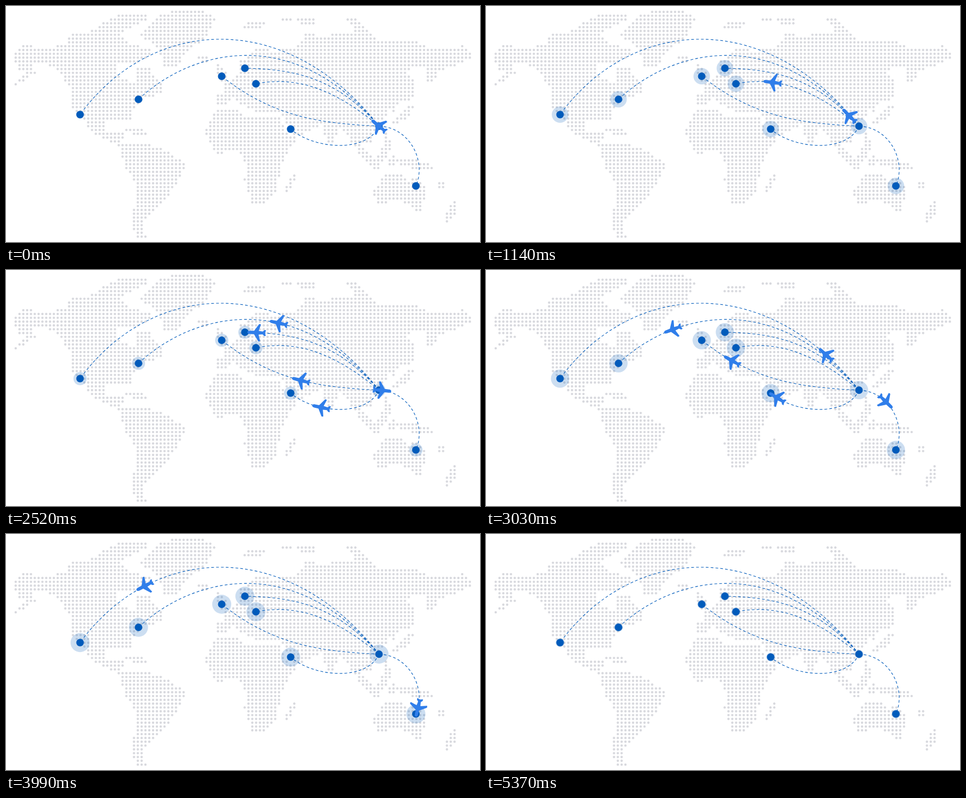
These frames come from a looping animation (880x440 px, 5.4 s). An HTML page with a canvas:

```html
<!DOCTYPE html>
<html lang="en">
<head>
<meta charset="utf-8">
<title>Flight routes</title>
<style>
  html, body { margin: 0; width: 100%; height: 100%; overflow: hidden; background: #fff; }
  canvas { display: block; }
</style>
</head>
<body>
<canvas id="stage" width="880" height="440"></canvas>
<script>
const LOOP = 5400, PULSE = 900, FLIGHT = 1800;
const BLUE = '#005bbb', HALO = 'rgba(0, 91, 187, 0.2)', SKY = '#307eea', LAND = '#d8d9de';
const HUB = [692.5, 224];

// Rough coastlines; the map shows the grid dots that fall inside them.
const continents = {
  northAmerica: 'M14 86 36 72 78 80 112 70 122 50 156 48 194 22 216 15 264 15 262 24 222 46 212 56 230 72 268 78 268 94 238 106 208 106 206 126 240 146 240 112 264 114 290 148 292 160 250 176 234 200 236 218 222 210 182 216 186 234 220 234 216 254 228 264 214 264 164 238 121 188 121 150 84 112 62 106 50 112 54 126 14 150 36 122 20 120Z',
  greenland: 'M318 8 358 8 392 22 366 64 332 88 318 114 296 114 278 76 246 52 286 16Z',
  southAmerica: 'M208 256 262 256 298 271 332 290 332 304 312 338 296 362 256 398 256 420 262 433 242 433 234 410 242 334 220 298Z',
  africa: 'M390 192 428 192 446 206 506 206 528 244 540 246 510 296 504 340 482 370 456 370 442 320 450 304 432 270 390 276 370 236Z',
  eurasia: 'M390 164 406 164 402 150 434 128 432 106 468 78 500 84 540 78 560 48 580 50 562 62 622 50 668 42 692 62 762 64 780 76 836 78 850 70 866 96 832 112 806 120 794 146 782 142 780 116 742 118 758 138 758 170 726 184 726 202 702 188 708 200 678 240 684 258 660 258 672 278 646 262 622 224 602 262 584 222 534 248 512 200 458 196 418 170 412 186 390 186Z',
  australia: 'M706 313 736 313 752 328 756 312 782 342 770 388 734 362 688 369 680 346Z'
};

// Islands as tilted ellipses: x, y, rx, ry, degrees.
const islands = [
  [367, 99, 10, 7, 0], [401, 128, 8, 20, -20], [242, 233, 21, 6, 8],
  [528, 331, 6, 18, 18], [462, 36, 22, 8, -15], [522, 26, 11, 6, 0],
  [558, 27, 20, 8, 0], [650, 34, 20, 7, 35], [738, 203, 26, 7, -40],
  [707, 253, 6, 20, -10], [698, 280, 9, 16, 25], [674, 286, 28, 8, 40],
  [719, 290, 8, 10, 0], [762, 296, 34, 8, 10], [808, 333, 7, 7, 0],
  [826, 385, 8, 24, 28]
];

// Each route: destination, control points from hub to city, departure time.
const routes = [
  { city: [464, 145], bend: [610, 155, 540, 130], start: 0 },
  { city: [443.5, 116], bend: [610, 130, 530, 118], start: 980 },
  { city: [528.5, 229.5], bend: [670, 274, 573, 268], start: 1500 },
  { city: [400.5, 131], bend: [590, 219, 500, 210], start: 1790 },
  { city: [246, 174], bend: [530, 28, 340, 85], start: 1820 },
  { city: [761, 335.5], bend: [750, 226, 781, 290], start: 2460 },
  { city: [137.5, 202.5], bend: [520, 3, 270, 20], start: 2800 }
];

for (const r of routes) {
  r.d = `M${HUB} C${r.bend} ${r.city}`;
  r.path = document.createElementNS('http://www.w3.org/2000/svg', 'path');
  r.path.setAttribute('d', r.d);
  r.length = r.path.getTotalLength();
}
const cities = [HUB, ...routes.map(r => r.city)];

// Plane pointing along +x, centred on its wings.
const plane = new Path2D(
  'M17.5 0C17.5-2 15.5-3 13-3L5-3.2-3.5-16Q-5-17-7-15.5L-3.5-3.5-11-2.6-14-5.5-17-5.5' +
  '-15.5 0-17 5.5-14 5.5-11 2.6-3.5 3.5-7 15.5Q-5 17-3.5 16L5 3.2 13 3C15.5 3 17.5 2 17.5 0Z');

const ctx = document.getElementById('stage').getContext('2d');

function disc(g, x, y, r, fill) {
  g.fillStyle = fill;
  g.beginPath();
  g.arc(x, y, r, 0, Math.PI * 2);
  g.fill();
}

function landShapes() {
  const shapes = Object.values(continents).map(d => new Path2D(d));
  for (const [x, y, rx, ry, deg] of islands) {
    const shape = new Path2D();
    shape.ellipse(x, y, rx, ry, deg * Math.PI / 180, 0, Math.PI * 2);
    shapes.push(shape);
  }
  return shapes;
}

function drawBackdrop() {
  const layer = document.createElement('canvas');
  layer.width = 880;
  layer.height = 440;
  const g = layer.getContext('2d');
  g.fillStyle = '#fff';
  g.fillRect(0, 0, 880, 440);

  const land = landShapes();
  for (let row = 0; row < 60; row++) {
    for (let col = 0; col < 120; col++) {
      const x = 18 + col * 7.085, y = 11 + row * 7.1;
      if (land.some(s => g.isPointInPath(s, x, y))) disc(g, x, y, 2.2, LAND);
    }
  }

  g.strokeStyle = BLUE;
  g.lineWidth = 1.1;
  g.setLineDash([5, 4]);
  for (const r of routes) g.stroke(new Path2D(r.d));
  return layer;
}
const backdrop = drawBackdrop();

// Quick swell, then a steady shrink.
function haloRadius(t) {
  const p = t % PULSE, swell = 500;
  const size = p < swell ? 1 - (1 - p / swell) ** 2 : (PULSE - p) / (PULSE - swell);
  return 7.5 + 10.7 * size;
}

// Steady speed that slows on approach.
const ease = p => p + 0.62 * p * p * (1 - p);

function drawPlane(route, t) {
  const p = (t - route.start) / FLIGHT;
  if (p < 0 || p > 1) return;
  const d = ease(p) * route.length;
  const at = route.path.getPointAtLength(d);
  const a = route.path.getPointAtLength(Math.max(0, d - 1));
  const b = route.path.getPointAtLength(Math.min(route.length, d + 1));
  ctx.save();
  ctx.translate(at.x, at.y);
  ctx.rotate(Math.atan2(b.y - a.y, b.x - a.x));
  ctx.fillStyle = SKY;
  ctx.fill(plane);
  ctx.restore();
}

function render(t) {
  ctx.drawImage(backdrop, 0, 0);
  const r = haloRadius(t);
  for (const [x, y] of cities) {
    disc(ctx, x, y, r, HALO);
    disc(ctx, x, y, 7, BLUE);
  }
  for (const route of routes) drawPlane(route, t);
}

const begin = performance.now();
function tick() {
  render((performance.now() - begin) % LOOP);
  requestAnimationFrame(tick);
}
tick();
</script>
</body>
</html>
```
